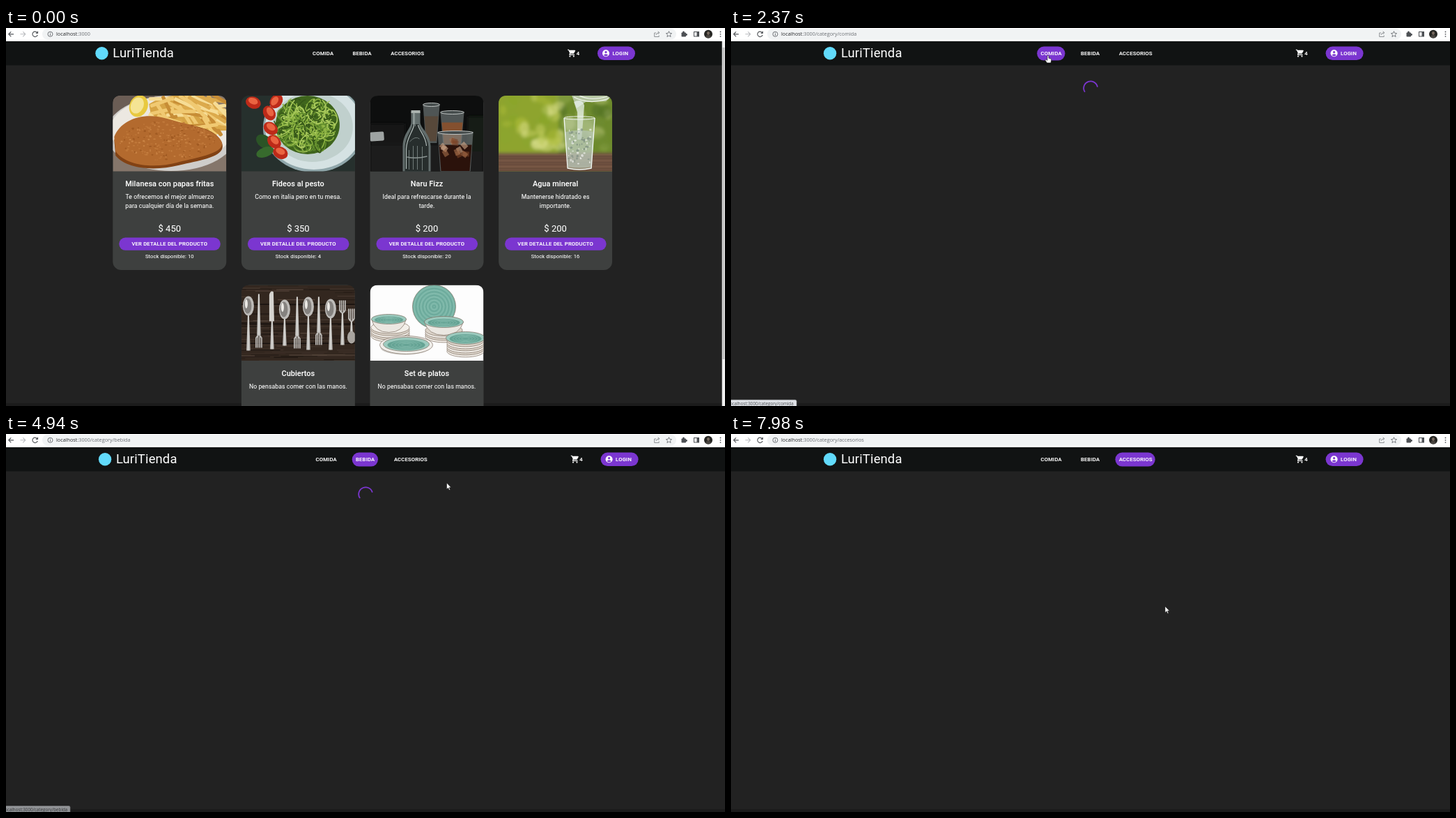
Animation, 1032 px wide and 542 px high, one loop 8 s. Source, as an HTML page:

```html
<!DOCTYPE html>
<html lang="es">
<head>
<meta charset="utf-8">
<title>LuriTienda</title>
<style>
  html, body { margin: 0; width: 100%; height: 100%; overflow: hidden; background: #222; }
  svg { display: block; width: 100%; height: 100%; }
  text { font-family: Roboto, sans-serif; white-space: pre; }
  .ui { font-family: "Open Sans", "Noto Sans", sans-serif; }
  .button { font-size: 7.6px; font-weight: 500; letter-spacing: .0286em; fill: #fff; stroke: #fff; stroke-width: .15; }
</style>
</head>
<body>
<svg id="stage" viewBox="0 0 1032 542"></svg>
<script>
const PURPLE = '#7b36d0', LOOP = 8000;
const NAV = [['COMIDA', 440, 29.5], ['BEBIDA', 497.5, 26.5], ['ACCESORIOS', 552.3, 46.5]];

let seed = 7;
const rnd = (a = 0, b = 1) => a + (b - a) * ((seed = seed * 16807 % 2147483647) / 2147483647);
const pick = list => list[Math.floor(rnd(0, list.length))];
const many = (n, fn) => Array.from({ length: n }, (_, i) => fn(i)).join('');

const rect = (x, y, w, h, fill, extra = '') => `<rect x="${x}" y="${y}" width="${w}" height="${h}" fill="${fill}" ${extra}/>`;
const oval = (x, y, rx, ry, fill, extra = '') => `<ellipse cx="${x}" cy="${y}" rx="${rx}" ry="${ry}" fill="${fill}" ${extra}/>`;
const shape = (d, fill, extra = '') => `<path d="${d}" fill="${fill}" ${extra}/>`;
const line = (d, color, width = 1, extra = '') => `<path d="${d}" fill="none" stroke="${color}" stroke-width="${width}" ${extra}/>`;
const text = (x, y, str, size, extra = '') => `<text x="${x}" y="${y}" font-size="${size}" ${extra}>${str}</text>`;
const blurred = content => `<g filter="url(#blur)">${content}</g>`;
const centered = 'fill="#fff" text-anchor="middle" stroke="#fff" stroke-width=".08" ';
const tilt = (deg, x, y) => `transform="rotate(${deg} ${x} ${y})"`;

/* Product pictures, each 163 x 108.5 */
function milanesa() {
  return rect(0, 0, 163, 109, '#85766b') + rect(0, 0, 60, 30, '#6b5d55') +
    oval(84, 54, 94, 54, '#cfcdca') + oval(84, 49, 88, 48, '#ece8e1') +
    shape('M52 12Q80-6 130 0L163 20V50L110 52 56 36Z', '#d6a445') +
    many(60, () => {
      const x = rnd(62, 160), y = rnd(2, 46);
      return rect(x - 18, y, 36, 5, pick(['#f0c972', '#dcaa4c', '#f6dc95', '#c78d36']), 'rx="1.5" ' + tilt(rnd(-20, 65), x, y));
    }) +
    oval(37, 15, 13, 16, '#e8c93f', tilt(25, 37, 15)) + oval(35, 14, 9, 12, '#f5e494', tilt(25, 35, 14)) +
    shape('M2 64C10 36 44 25 76 34S146 44 156 66 126 92 94 100 20 106 4 86Z', '#824214') +
    shape('M2 59C12 33 46 23 78 33S144 46 155 64 122 88 92 96 20 102 4 80Z', '#b36a2e') +
    many(260, () => {
      const a = rnd(0, 6.28), r = Math.sqrt(rnd());
      return oval(78 + 68 * r * Math.cos(a), 65 + 28 * r * Math.sin(a), rnd(.6, 2.2), rnd(.5, 1.4), pick(['#c98344', '#a05a22', '#bf7739']));
    });
}

function pesto() {
  const tomato = (x, y, deg) => oval(x, y, 11, 8.5, '#bd2a19', tilt(deg, x, y)) + oval(x - 1, y - 2, 7, 4.5, '#ea6441', tilt(deg, x, y));
  return rect(0, 0, 163, 109, '#26302d') +
    oval(104, 46, 73, 64, '#8fa6aa') + oval(104, 45, 70, 61, '#d5e2e3') + oval(102, 45, 58, 50, '#c0d0cd') +
    oval(95, 42, 46, 42, '#3f651d') +
    many(130, () => {
      const a = rnd(0, 6.28), r = Math.sqrt(rnd()) * 38;
      const x = 95 + r * Math.cos(a), y = 42 + r * .9 * Math.sin(a);
      return oval(x, y, rnd(5, 15), rnd(3, 9), 'none', `stroke="${pick(['#8cb341', '#aaca5d', '#618d2c', '#355618'])}" stroke-width="1.6" stroke-dasharray="28 12" ` + tilt(rnd(0, 180), x, y));
    }) +
    oval(33, 66, 13, 9, '#2b5426', tilt(35, 33, 66)) + oval(34, 81, 13, 7, '#376a2d', tilt(-20, 34, 81)) +
    tomato(17, 10, 20) + tomato(50, 8, -55) + tomato(40, 25, 60) + tomato(42, 47, 35) + tomato(47, 66, 45) + tomato(56, 82, 25);
}

function cola() {
  const glass = (x, y, w, h, drink) => shape(`M${x} ${y}h${w}l-4 ${h}h${8 - w}Z`, '#7c8484', 'opacity=".6"') +
    shape(`M${x + 2} ${y + h * .3}h${w - 4}l-3 ${h * .65}h${10 - w}Z`, drink) +
    oval(x + w / 2, y, w / 2, 2.5, '#454c4c', 'stroke="#cbd0ce" stroke-width=".9"');
  return rect(0, 0, 163, 109, '#0d0e0e') +
    blurred(rect(0, 70, 163, 45, '#1b1b1b') + rect(0, 40, 50, 28, '#181614') + rect(140, 30, 30, 50, '#171a18')) +
    rect(0, 52, 20, 13, '#9ea3a2', 'rx="2" ' + tilt(-4, 10, 58)) +
    glass(76, 13, 24, 55, '#57483a') + glass(101, 24, 34, 48, '#84502f') +
    shape('M59 23h13v15c0 9 14 15 15 34v37H47V72c1-19 12-25 12-34Z', '#626d6c') +
    shape('M61 41h9c1 9 13 17 14 32v36H50V73c1-15 10-23 11-32Z', '#272e2d') +
    line('M63 25v18C60 54 53 60 52 76v29M69 42c1 8 11 15 12 30', '#b4bfbc', 1.2) + rect(59, 21, 13, 4, '#aab2ae') +
    line('M65 26v18M57 66q8-9 14-4M56 78v28M62 72v34M68 72v34M75 73v34', '#6f7a78', 1) +
    line('M53 88q13 3 29-1', '#8a9492', 1.6) +
    glass(97, 53, 51, 58, '#2b120b') +
    many(12, () => { const x = rnd(103, 136), y = rnd(57, 80); return rect(x, y, 9, 7, pick(['#a9704c', '#7b4226', '#d3ab8b']), 'opacity=".6" ' + tilt(rnd(0, 70), x, y)); });
}

function water() {
  const bokeh = many(60, () => {
    const x = rnd(0, 163);
    return oval(x, rnd(0, 74), rnd(4, 13), rnd(4, 12), pick(x < 90 ? ['#a9ba36', '#c6cf62', '#8aa52c', '#dbe08f'] : ['#6e8c30', '#92a84a', '#4d6d26', '#b9c578']), 'opacity=".5"');
  });
  return rect(0, 0, 163, 109, '#6d8a2c') +
    blurred(rect(-9, -9, 95, 95, '#8ea42f') + bokeh + rect(-9, 82, 181, 40, '#6f5140')) +
    many(9, i => rect(0, 84 + i * 2.9, 163, .8, i % 3 ? '#5b4233' : '#8a6953', 'opacity=".6"')) +
    shape('M105 0h58l-9 8-29 1-13 9Z', '#ccd8c8', 'opacity=".75"') + line('M108 2q22 12 50 2M116 0q16 8 40 1', '#f4f8f1', 1.2) +
    shape('M108 9q12-6 15 5l-4 49h-6V24Z', '#e9f2ed', 'opacity=".75"') +
    shape('M94 32h44l-5 72q-17 4-34 0Z', '#cbd8bd', 'opacity=".45"') + shape('M96 52q20-5 41 0l-4 50q-17 3-33 0Z', '#b9c8bd', 'opacity=".6"') +
    line('M94 32l5 72q17 4 34 0l5-72', '#eef5f1', 1.4) + oval(116, 32, 22, 2.2, 'none', 'stroke="#f1f6f2" stroke-width="1"') +
    many(70, () => oval(rnd(100, 132), rnd(48, 98), rnd(.5, 2), rnd(.5, 2), pick(['#fff', '#76857c']), 'opacity=".6"'));
}

function cutlery() {
  const STEEL = '#bdbbb8';
  const handle = (x, a, b) => shape(`M${x - 1} ${a}h2l1.8 ${b - a}h-5.6Z`, STEEL) + line(`M${x} ${a}V${b}`, '#efeeeb', .8);
  const spoon = (x, y, end) => handle(x, y + 13, end) + oval(x, y, 8, 14, STEEL) + oval(x - 1, y, 5.5, 11, '#85827f') + oval(x - 3, y - 3, 2, 6.5, '#eceae6');
  const fork = (x, a, b) => {
    const s = b < a ? -1 : 1;
    return handle(x, Math.min(a, b - s * 18), Math.max(a, b - s * 18)) +
      line(`M${x - 4} ${b}v${-s * 14}q4 ${-s * 8} 8 0v${s * 14}M${x - 1.4} ${b}v${-s * 18}M${x + 1.4} ${b}v${-s * 18}`, STEEL, 1.7);
  };
  return rect(0, 0, 163, 109, '#33271f') +
    many(90, () => rect(rnd(-40, 150), rnd(0, 109), rnd(20, 90), rnd(.4, 1.5), pick(['#54443a', '#211914', '#3f3129']))) +
    many(3, i => rect(0, 27 + i * 28, 163, 1.5, '#17110e')) +
    spoon(10, 30, 94) + fork(25, 13, 90) + handle(44, 50, 92) + shape('M40 52V14q2-7 6-4l1 42Z', '#d5d3cf') +
    spoon(62, 35, 87) + fork(80, 17, 91) + spoon(96, 31, 93) + fork(111, 17, 86) + spoon(128, 34, 93) +
    fork(145, 86, 22) + fork(158, 82, 34) + oval(158, 75, 6, 9, '#a8a49f');
}

function plates() {
  const TEAL = '#76b3a4';
  const rim = 'stroke="#7d6d61" stroke-width=".7"';
  const stack = (x, y, r, n) => many(n, i => oval(x, y + (n - i) * 3, r * .95, r * .3, i % 2 ? '#dcd4ca' : '#f3efe9', rim));
  const dish = (x, y, r, ry) => oval(x, y, r, ry, '#9ccabe', rim) + oval(x, y + 1, r * .82, ry * .72, '#65a394') +
    many(4, i => oval(x, y + 1, r * (.2 + i * .15), ry * (.2 + i * .13), 'none', 'stroke="#8fc3b5" stroke-width=".6"'));
  const bowl = (x, y, r, ry) => shape(`M${x - r} ${y}q${r * .2} 19 ${r} 19t${r} -19Z`, '#ebe7e1', rim) + dish(x, y, r, ry);
  return rect(0, 0, 163, 109, '#fdfdfd') +
    oval(92, 31, 31, 31, TEAL, rim) +
    many(12, i => oval(92, 31, 2 + i * 2.4, 2 + i * 2.4, 'none', `stroke="${i % 2 ? '#8fc2b4' : '#62a092'}" stroke-width=".8"`)) +
    stack(29, 58, 29, 5) + bowl(27, 49, 25, 7) + stack(106, 62, 28, 4) + bowl(106, 53, 28, 8) +
    stack(137, 77, 28, 6) + dish(137, 76, 28, 9) +
    oval(50, 90, 35, 10, '#cfcdc9') + oval(52, 86, 38, 13, '#f0eeea', rim) + dish(52, 85, 33, 10);
}

const PRODUCTS = [
  [milanesa, 'Milanesa con papas fritas', ['Te ofrecemos el mejor almuerzo', 'para cualquier día de la semana.'], 450, 10],
  [pesto, 'Fideos al pesto', ['Como en italia pero en tu mesa.'], 350, 4],
  [cola, 'Naru Fizz', ['Ideal para refrescarse durante la', 'tarde.'], 200, 20],
  [water, 'Agua mineral', ['Mantenerse hidratado es', 'importante.'], 200, 16],
  [cutlery, 'Cubiertos', ['No pensabas comer con las manos.'], 300, 12],
  [plates, 'Set de platos', ['No pensabas comer con las manos.'], 900, 8]
];

const cardDefs = PRODUCTS.map(([picture, title, about, price, stock], i) => `<g id="card${i}">` +
  rect(0, 0, 163, 250, '#3e403f', 'rx="12"') + `<g clip-path="url(#top)">${picture()}</g>` +
  text(81.5, 130, title, 10.85, centered + 'font-weight="500" letter-spacing=".08"') +
  about.map((row, k) => text(81.5, 148.3 + k * 13, row, 8.68, centered + 'letter-spacing=".08"')).join('') +
  text(81.5, 194.8, '$ ' + price, 13.02, centered) +
  rect(9, 203.5, 145.5, 18.3, PURPLE, `rx="9.1" class="buy${i}"`) +
  text(81.5, 215.2, 'VER DETALLE DEL PRODUCTO', 7.6, 'class="button" text-anchor="middle"') +
  text(81.5, 233.3, 'Stock disponible: ' + stock, 7.6, centered + 'letter-spacing=".08"') + '</g>').join('');

const row = (ids, center, y) => ids.map((id, k) =>
  `<use href="#card${id}" x="${center + (k - (ids.length - 1) / 2) * 184.6 - 81.5}" y="${y}"/>`).join('');

const browserBar = rect(0, 0, 1032, 19, '#fff') + rect(52, 1, 910, 15.5, '#f1f3f4', 'rx="7.7"') +
  line('M11 8.8H4M7.3 5.3 3.8 8.8l3.5 3.5', '#55585c', 1.2) + line('M20.5 8.8h7M24.3 5.3l3.5 3.5-3.5 3.5', '#b9bbbe', 1.1) +
  line('M44.7 6.6A3.7 3.7 0 1 0 45.3 9.8M45.5 4.7v2.7h-2.7', '#55585c', 1.2) +
  oval(63.5, 8.8, 3.5, 3.5, 'none', 'stroke="#5f6368" stroke-width=".9"') + line('M63.5 8.2v2.7M63.5 6.5v1', '#5f6368', .9) +
  line('M933 7h-2.3v5.5h6.5v-2M933 10q.5-3.3 4.6-3.3M935.7 4.8l2.2 1.9-2.2 2', '#777a7e', .8) +
  line('M951.5 4.7l1.2 2.7 2.9.3-2.2 2 .7 2.9-2.6-1.6-2.6 1.6.7-2.9-2.2-2 2.9-.3Z', '#5f6368', .8) +
  rect(969.5, 6.5, 6.5, 6, '#4d5054', 'rx=".8"') + oval(972.5, 6, 1.5, 1.5, '#4d5054') + oval(976.5, 9.5, 1.4, 1.4, '#4d5054') +
  rect(987.5, 5.5, 7, 6.5, 'none', 'stroke="#4d5054"') + rect(991.5, 5.5, 3, 6.5, '#4d5054') +
  oval(1008, 8.7, 6, 6, '#252522') + oval(1008, 7.5, 2, 2.4, '#77695f') + oval(1008, 12, 3.6, 2, '#494540') +
  many(3, i => oval(1025.5, 5.5 + i * 3.3, .9, .9, '#55585c')) +
  `<text class="ui" x="72" y="11.4" font-size="7.25" fill="#25272a">localhost<tspan fill="#6a6e73">:3000<tspan id="path"></tspan></tspan></text>`;

const cart = `<g transform="translate(805.6 29.7) scale(.5425)">` +
  shape('M1 2v2h2l3.6 7.6-1.4 2.4Q4.3 17 7 17h12v-2H7.4l1-1.9h7.5q1.2 0 1.8-1L21.5 5 20 4H5.2L4.3 2Z', '#fff') +
  oval(7, 20, 2, 2, '#fff') + oval(17, 20, 2, 2, '#fff') + '</g>';

const header = oval(137.5, 36.2, 9.2, 9.2, '#61dafb') +
  text(153.3, 42.2, 'LuriTienda', 18.44, 'fill="#fff" letter-spacing=".136"') +
  NAV.map(([label, x, w], i) => rect(x - 5.4, 26.6, w + 10.8, 20, PURPLE, `rx="10" id="pill${i}" opacity="0"`) + text(x, 39.1, label, 7.6, 'class="button"')).join('') +
  cart + text(818.7, 39, '4', 7.6, 'class="button"') +
  rect(849, 26.6, 54, 19.4, PURPLE, 'rx="9.7"') + oval(861, 36.3, 5, 5, '#fff') + oval(861, 34.6, 1.6, 1.6, PURPLE) +
  shape('M857.8 38.8q3.2-3 6.4 0-3.2 3.2-6.4 0Z', PURPLE) + text(870.5, 38.8, 'LOGIN', 7.6, 'class="button"');

const stage = document.getElementById('stage');
stage.innerHTML = `<defs><clipPath id="top"><path d="M0 108.5V12Q0 0 12 0H151Q163 0 163 12V108.5Z"/></clipPath>` +
  `<filter id="blur"><feGaussianBlur stdDeviation="2"/></filter>${cardDefs}</defs>` +
  rect(0, 0, 1032, 542, '#222') + rect(0, 538, 1032, 4, '#1b1b1b') + rect(0, 19, 1032, 34.5, '#111313') +
  `<g id="home">${row([0, 1, 2, 3], 511.7, 97)}${row([4, 5], 511.7, 368.5)}` +
  rect(1027.7, 19, 4.3, 523, '#f1f1f1') + rect(1028.5, 28, 3, 447, '#c1c1c1') + '</g>' +
  `<g id="list0">${row([0, 1], 516.2, 163)}</g><g id="list1">${row([2, 3], 516.2, 163)}</g>` +
  `<g id="header">${header}</g>` + browserBar +
  `<circle id="spinner" r="20.2" fill="none" stroke="${PURPLE}" stroke-width="3.6"/>` +
  `<g id="status">${rect(-3, 533.3, 97, 12, '#dee1e6', 'id="statusBox" rx="2" stroke="#b5b8bd" stroke-width=".6"')}` +
  `<text id="statusText" class="ui" x="-2" y="541.3" font-size="6.25" fill="#4a4d51"></text></g>` +
  `<g id="cursor"><path id="arrow" d="M0 0V9.3L2.2 7.3 3.6 10.6 5.1 9.9 3.7 6.8H6.5Z" fill="#fff" stroke="#111" stroke-width=".6"/>` +
  `<path id="hand" d="M-1 1Q0-.6 1 1V4.2L4 5Q5 5.4 4.8 7L4 11H-1.5L-4 7.2Q-4 5.7-2.6 6.2L-1 7.4Z" fill="#fff" stroke="#111" stroke-width=".6"/></g>`;

const $ = id => document.getElementById(id);
const show = (id, on) => $(id).style.display = on ? '' : 'none';
const clamp = v => Math.max(0, Math.min(1, v));
const ease = v => v * v * (3 - 2 * v);

const VISITS = [
  { name: 'comida', press: 1800, start: 1960, loaded: 3790 },
  { name: 'bebida', press: 4310, start: 4535, loaded: 6345 },
  { name: 'accesorios', press: 6550, start: 6706, loaded: 8600 }
];
const TRACK = [
  [220, 826, 478], [390, 400, 308], [550, 400, 308], [650, 372, 352], [760, 294, 262], [960, 447, 74],
  [1140, 460, 45], [1300, 460, 45], [1450, 455, 39], [2640, 455, 39], [3250, 516.5, 37], [4600, 516.5, 37],
  [4900, 632.5, 70], [6100, 632.5, 70], [6500, 597, 35], [6800, 597, 35], [7560, 500, 318], [7620, 500, 318], [7980, 623, 247]
];
const ON_LINK = [[340, 600], [1330, 2850], [3050, 4660], [6350, 6880]];

function pointer(t) {
  const next = TRACK.findIndex(k => k[0] > t);
  if (next < 1) return next ? TRACK.at(-1).slice(1) : [-50, -50];
  const [t0, x0, y0] = TRACK[next - 1], [t1, x1, y1] = TRACK[next];
  const k = ease((t - t0) / (t1 - t0));
  return [x0 + (x1 - x0) * k, y0 + (y1 - y0) * k];
}

function drawSpinner(age) {
  const p = age / 1276 % 1;
  const grow = ease(clamp(p * 2)), shrink = ease(clamp(p * 2 - 1));
  $('spinner').setAttribute('transform', `translate(516.2 86.3) scale(.493) rotate(${p * 360})`);
  $('spinner').setAttribute('stroke-dasharray', `${1 + 99 * grow} 200`);
  $('spinner').setAttribute('stroke-dashoffset', -15 * grow - 112 * shrink);
}

function drawStatus(t) {
  const [from, to, name, width] = t > 6000 ? [6615, 7100, 'accesorios', 105]
    : [1340, 5030, ...(t < 2950 ? ['comida', 97] : ['bebida', 95])];
  $('status').setAttribute('opacity', clamp(Math.min((t - from) / 120, (to - t) / 150)));
  $('statusBox').setAttribute('width', width);
  $('statusText').textContent = 'ocalhost:3000/category/' + name;
}

function draw(t) {
  const current = VISITS.findLastIndex(v => t >= v.start);
  const visit = VISITS[current];
  show('home', !visit);
  show('list0', current === 0 && t >= visit.loaded);
  show('list1', current === 1 && t >= visit.loaded);
  $('header').setAttribute('transform', `translate(${visit ? 4.6 : 0} 0)`);
  $('path').textContent = visit ? '/category/' + visit.name : '';
  VISITS.forEach((v, i) => $('pill' + i).setAttribute('opacity',
    i === current ? 1 : i === current + 1 ? clamp((t - v.press) / (v.start - v.press)) : 0));

  show('spinner', visit && t < visit.loaded);
  if (visit) drawSpinner(t - visit.start);
  drawStatus(t);

  document.querySelector('.buy1').setAttribute('fill', t > 340 && t < 600 ? '#6529b0' : PURPLE);
  const onLink = ON_LINK.some(([a, b]) => t >= a && t < b);
  $('cursor').setAttribute('transform', `translate(${pointer(t)})`);
  show('hand', onLink);
  show('arrow', !onLink);
}

const began = performance.now();
function tick() {
  draw((performance.now() - began) % LOOP);
  requestAnimationFrame(tick);
}
tick();
</script>
</body>
</html>
```
